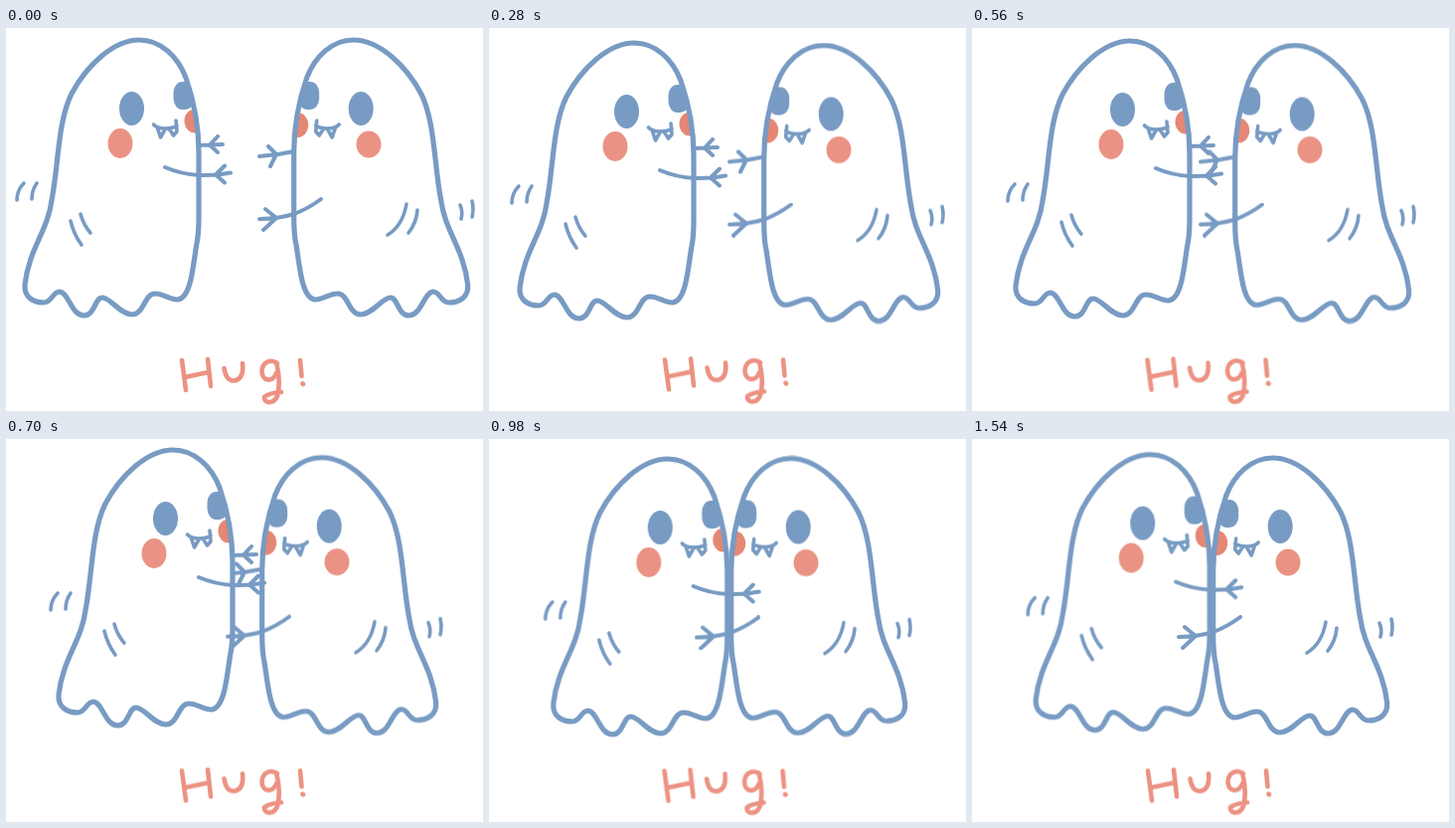
These frames come from a looping animation (480x385 px, 1680 ms). An HTML page:

```html
<!DOCTYPE html>
<html lang="en">
<head>
<meta charset="utf-8">
<title>Hugging ghosts</title>
<style>
  html, body { margin: 0; width: 100%; height: 100%; overflow: hidden; background: #fff; }
  svg { display: block; width: 100%; height: 100%; }
  .line { fill: none; stroke: #789bc3; stroke-width: 4; stroke-linecap: round; stroke-linejoin: round; }
  .outline { stroke-width: 5.2; }
  .mark { stroke-width: 3.6; }
  .eye { fill: #789bc3; }
  .cheek { fill: #ea9384; }
  .inner { fill: #e58775; }
  .word { fill: none; stroke: #ec9282; stroke-width: 4.6; stroke-linecap: round; stroke-linejoin: round; }

  .left { animation: left 1680ms step-end infinite; }
  .right { animation: right 1680ms step-end infinite; }
  .word { animation: word 420ms step-end infinite; }

  @keyframes left {
    0% { transform: translate(0, 0); }
    8.333% { transform: translate(6.3px, 1px); }
    16.666% { transform: translate(12px, 3px); }
    25% { transform: translate(17.8px, 4.3px); }
    33.333% { transform: translate(25px, 1px); }
    41.666% { transform: translate(34px, -1px); }
    50% { transform: translate(38px, 7px); }
    58.333% { transform: translate(45.7px, 8px); }
    66.666% { transform: translate(45.5px, 9px); }
    75% { transform: translate(45.5px, 11px); }
    83.333% { transform: translate(45.3px, 5px); }
    91.666% { transform: translate(45.2px, 3.6px); }
  }
  @keyframes right {
    0% { transform: translate(0, 0); }
    8.333% { transform: translate(-6px, 6.5px); }
    16.666% { transform: translate(-13px, 5.5px); }
    25% { transform: translate(-18px, 4.6px); }
    33.333% { transform: translate(-25px, 5.5px); }
    41.666% { transform: translate(-32px, 6.6px); }
    50% { transform: translate(-40px, 7px); }
    58.333% { transform: translate(-46px, 7.5px); }
    66.666% { transform: translate(-46px, 6px); }
    75% { transform: translate(-46px, 11.2px); }
    83.333% { transform: translate(-46px, 8px); }
    91.666% { transform: translate(-47px, 7px); }
  }
  @keyframes word {
    0% { transform: translate(0, 0); }
    33.333% { transform: translate(-.5px, -.4px); }
    66.666% { transform: translate(0, -.6px); }
  }
</style>
</head>
<body>
<svg viewBox="0 0 480 385" role="img" aria-label="Hug!">
  <defs>
    <filter id="crayon" filterUnits="userSpaceOnUse" x="0" y="0" width="480" height="385" color-interpolation-filters="sRGB">
      <feTurbulence type="fractalNoise" baseFrequency=".3" numOctaves="1" seed="4"/>
      <feDisplacementMap in="SourceGraphic" scale="1.5" xChannelSelector="R" yChannelSelector="G"/>
    </filter>
    <path id="body" d="M134 12C108 12 81 38 66 66C52 94 53 137 46 173C42 204 23 222 19 258C18 271 28 276 38 276C46 276 47 265 54 265C63 266 66 289 78 289C90 289 89 271 97 271C105 271 115 288 127 288C139 288 139 267 150 267C159 267 165 273.500 173 273C186 271 188 241 191.500 219Q194 208 194 190V125C194 100 189 73 181 50C173 29 156 12 134 12Z"/>
    <clipPath id="inside"><use href="#body"/></clipPath>
    <g id="shell">
      <use href="#body" fill="#fff"/>
      <rect class="eye" x="168.500" y="54" width="21" height="28" rx="9" ry="11" clip-path="url(#inside)"/>
      <ellipse class="eye" cx="126.500" cy="81" rx="12.500" ry="17"/>
      <path class="line mark" d="M148.500 97Q152 101 160 101Q168 101 172 98M152.500 101L155.500 110L160 102M164 101L168.500 108L172 104L171 93"/>
    </g>
    <use id="outline" href="#body" class="line outline"/>
  </defs>

  <g filter="url(#crayon)">
    <path class="left line" d="M194 118L218 117M213 109L205 117.500L213 125"/>
    <path class="right line" d="M290 124Q272 128 255 129M264 119L272 127L266 139"/>

    <g class="left">
      <use href="#shell"/>
      <g clip-path="url(#inside)"><ellipse class="inner" cx="190" cy="93.500" rx="10.500" ry="12"/></g>
      <use href="#outline"/>
      <ellipse class="cheek" cx="115" cy="116" rx="12.500" ry="15"/>
      <path class="line mark" d="M18 156Q11 163 11 173M31 156Q26 163 26 172M65 194Q68 207 76 218M75 187Q78 198 85 206"/>
    </g>
    <g class="right">
      <g transform="matrix(-1 0 0 1 483.700 0)">
        <use href="#shell"/>
        <g clip-path="url(#inside)"><ellipse class="inner" cx="190" cy="97.500" rx="10.500" ry="12.500"/></g>
        <use href="#outline"/>
      </g>
      <ellipse class="cheek" cx="365" cy="117" rx="12.500" ry="13.500"/>
      <path class="line mark" d="M457 178Q460 185 458 192M469 174Q471 182 469 190M403 177Q399 199 384 208M414 183Q413 196 405 206"/>
    </g>

    <path class="left line" d="M160 140Q176 147 195 148Q212 148.500 226 145.500M220 138.500L211 147.500L220 155.500"/>
    <path class="right line" d="M317 172Q305 181 290 187Q273 192 255 192M261 182L272 191L259 203"/>

    <path class="word" d="M177 334L181 364M203 333L206 360M180 351L204 346M219.500 342C221 352 225 355 230 354.500C237 353 239 346 238 337M273 337C266 332 258 336 257.500 345C257.500 355 268 357 272 347M272 336Q277 355 273 370C269 379 259 377 260 371Q264 367 277 366M296 334L297.500 350M298.500 357.500L299 358"/>
  </g>
</svg>
</body>
</html>
```
